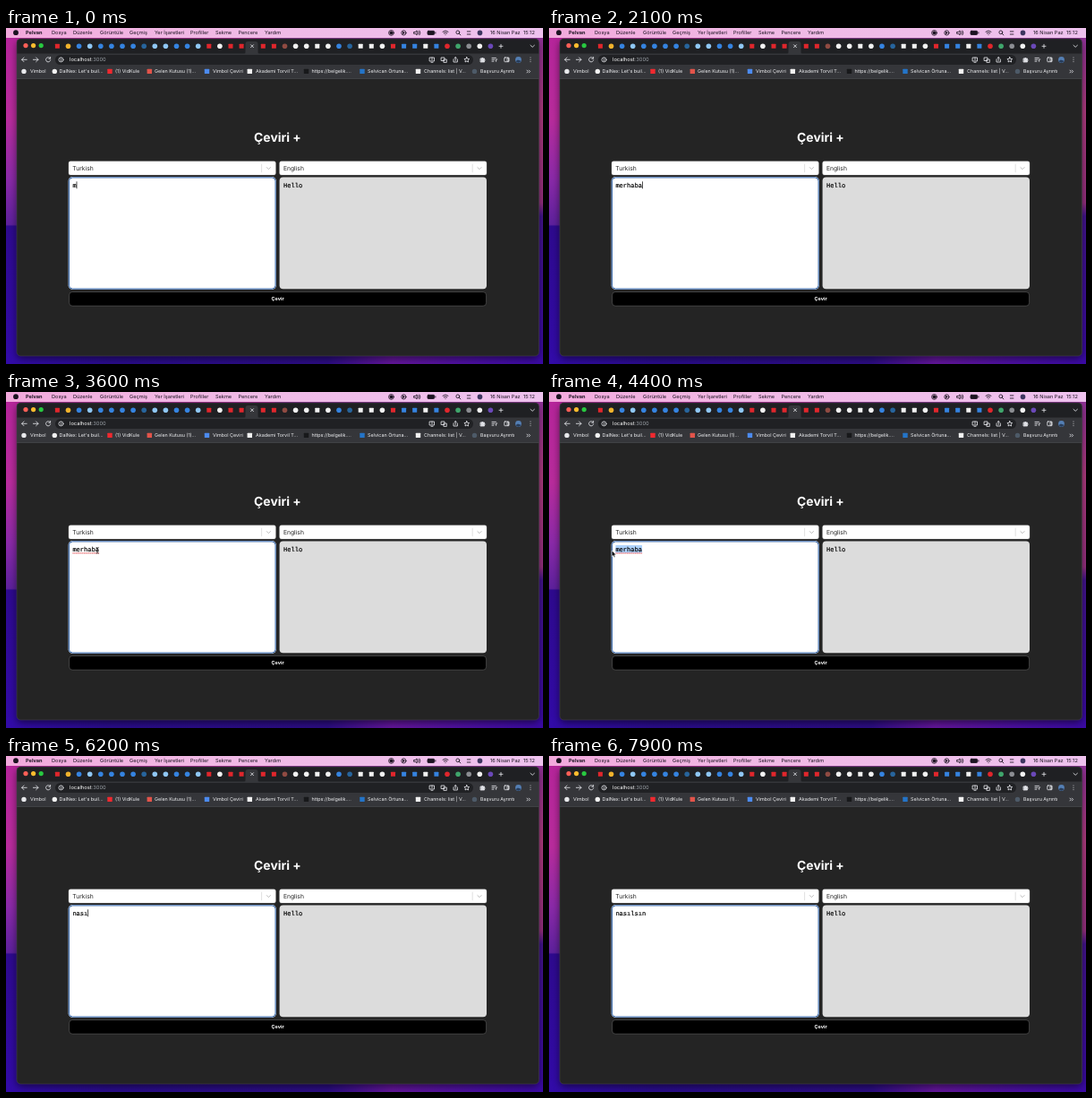
An HTML page for the animation above (8 s loop, 600x375 px).

```html
<!DOCTYPE html>
<html lang="tr">
<head>
<meta charset="utf-8">
<title>Çeviri</title>
<style>
html, body { margin: 0; width: 100%; height: 100%; overflow: hidden; background: #242424; }
svg { display: block; width: 100vw; height: 100vh; font-family: Inter, Roboto, sans-serif; text-rendering: geometricPrecision; }
text { white-space: pre; }
.menu { font-size: 5.6px; fill: #1b1220; }
.marks { font-size: 5.4px; fill: #f2f3f5; }
.pick { font-size: 6.75px; fill: #222; }
.mono { font: 7.06px "Courier New", "Liberation Mono", monospace; fill: #000; stroke: #000; stroke-width: .18; }
.line { fill: none; stroke: #dfe1e5; stroke-width: .85; stroke-linecap: round; stroke-linejoin: round; }
.dark { stroke: #1b1220; }
.bold { font-weight: 700; }
</style>
</head>
<body>
<svg viewBox="0 0 600 375" preserveAspectRatio="none">
  <defs>
    <linearGradient id="left" x1="0" y1="0" x2="0" y2="1">
      <stop offset="0" stop-color="#b5249a"/>
      <stop offset=".27" stop-color="#b82c9c"/>
      <stop offset=".45" stop-color="#8a2aa8"/>
      <stop offset=".585" stop-color="#5e219c"/>
      <stop offset=".59" stop-color="#2e0a8e"/>
      <stop offset="1" stop-color="#320ba8"/>
    </linearGradient>
    <linearGradient id="right" x1="0" y1="0" x2="0" y2="1">
      <stop offset="0" stop-color="#8a3098"/>
      <stop offset=".25" stop-color="#b03c80"/>
      <stop offset=".52" stop-color="#96307f"/>
      <stop offset=".56" stop-color="#43148e"/>
      <stop offset="1" stop-color="#3a0aa4"/>
    </linearGradient>
    <linearGradient id="floor">
      <stop offset="0" stop-color="#320ba8"/>
      <stop offset=".2" stop-color="#2a0c8c"/>
      <stop offset=".6" stop-color="#2c0d84"/>
      <stop offset=".72" stop-color="#64169c"/>
      <stop offset=".88" stop-color="#4a0fa4"/>
      <stop offset="1" stop-color="#3a0aa4"/>
    </linearGradient>
    <linearGradient id="bar">
      <stop offset="0" stop-color="#f2a9dc"/>
      <stop offset=".35" stop-color="#f0b8e4"/>
      <stop offset="1" stop-color="#eec2ee"/>
    </linearGradient>
    <filter id="soft" x="-5%" y="-5%" width="110%" height="110%"><feGaussianBlur stdDeviation="4"/></filter>
    <clipPath id="window"><rect x="12" y="12" width="583.5" height="354" rx="4.5"/></clipPath>
  </defs>

  <rect width="300" height="375" fill="url(#left)"/>
  <rect x="300" width="300" height="375" fill="url(#right)"/>
  <rect y="364" width="600" height="11" fill="url(#floor)"/>
  <rect x="12" y="15" width="583.5" height="354" rx="5" opacity=".55" filter="url(#soft)"/>
  <rect width="600" height="11" fill="url(#bar)"/>

  <!-- menu bar -->
  <circle cx="11" cy="5.2" r="2.9" fill="#1b1220"/>
  <g id="menu" class="menu"></g>
  <g class="line dark">
    <circle cx="430.5" cy="5.4" r="2.9"/>
    <circle cx="430.5" cy="5.4" r="1.6" fill="#1b1220"/>
    <circle cx="444.4" cy="5.4" r="2.6"/>
    <path d="M443.8 4.4l1.6 1-1.6 1z" fill="#1b1220"/>
    <path d="M456 4.5h1.3l1.8-1.6v5l-1.8-1.6H456zM460.7 4q1.1 1.4 0 2.8M462 3q1.8 2.4 0 4.8"/>
    <rect x="471" y="3.3" width="7.6" height="4.2" rx="1" fill="#1b1220"/>
    <path d="M479.9 4.8v1.2M488 4.2q3-2.5 6 0M489.2 5.8q1.8-1.5 3.6 0M491 7.4v.1"/>
    <circle cx="504.8" cy="4.8" r="1.9"/>
    <path d="M506.2 6.2l1.7 1.7M515.3 3.9h3.6M515.3 7h3.6"/>
  </g>
  <circle cx="529.5" cy="5.4" r="2.8" fill="#3d3560"/>

  <!-- browser -->
  <g clip-path="url(#window)">
    <rect x="12" y="12" width="584" height="355" fill="#242424"/>
    <rect x="12" y="12" width="584" height="17" fill="#1f2023"/>
    <path d="M266 29q1.5 0 1.5-2v-9q0-3 3-3h8q3 0 3 3v9q0 2 1.5 2z" fill="#35363a"/>
    <rect x="12" y="28.5" width="584" height="28" fill="#35363a"/>
    <rect x="12" y="56" width="584" height=".7" fill="#4a4b4f"/>
    <rect x="55" y="30" width="467" height="11" rx="5.5" fill="#202124"/>
    <circle cx="22" cy="19.6" r="2.6" fill="#fe5f57"/>
    <circle cx="30.6" cy="19.6" r="2.6" fill="#febc2e"/>
    <circle cx="39.2" cy="19.6" r="2.6" fill="#28c840"/>
    <g id="tabs"></g>
    <g class="line">
      <path d="M273.5 18.7l3 3m0-3l-3 3M551 20.3h4m-2-2v4M586 19.3l2.2 2 2.2-2"/>
      <path d="M23.2 35.3h-5.6m2.4-2.4l-2.4 2.4 2.4 2.4M30.4 35.3H36m-2.4-2.4l2.4 2.4-2.4 2.4"/>
      <path d="M49.3 33.8a2.6 2.6 0 1 0 .4 2.1M49.6 32.4v1.8h-1.8"/>
      <circle cx="61.5" cy="35.4" r="2.5"/>
      <path d="M61.5 35.3v1.2M61.5 34v.1"/>
      <path d="M473.5 33h5v4h-5zM476 33v2.7M475 38.3h2"/>
      <path d="M486.5 33h3.5v3.5h-3.5zM489.3 35h3v3.4h-3z"/>
      <path d="M500 35v3h4.4v-3M502.2 36.4v-3.8m-1.2 1.1l1.2-1.1 1.2 1.1"/>
      <path d="M514.8 32.5l.9 1.9 2 .2-1.5 1.4.4 2-1.8-1-1.8 1 .4-2-1.5-1.4 2-.2z"/>
      <path d="M530.4 34h1.3q.6-2 1.2 0h1.6v1.4q1.8.6 0 1.2v1.4h-4.1z" fill="#dfe1e5"/>
      <path d="M543 33.4h4.4M543 35.3h3M543 37.2h2M547.6 37.4v-2.4h1.2"/>
      <rect x="556.8" y="33" width="5.2" height="4.7" rx=".6"/>
      <path d="M560.4 33.5h1.2v3.8h-1.2zM586 33v.1M586 35.3v.1M586 37.6v.1"/>
    </g>
    <circle cx="572.5" cy="35.4" r="3.4" fill="#547fb4"/>
    <path d="M569.5 37l2.4-1.6 3.6 1.4q-1.2 2-3 2t-3-1.8z" fill="#263c5a"/>
    <text x="71" y="37.4" font-size="5.75" fill="#fff">localhost<tspan fill="#9aa0a6">:3000</tspan></text>
    <g id="marks" class="marks"></g>
    <path class="line" d="M572 47.1l1.3 1.4-1.3 1.4M574.3 47.1l1.3 1.4-1.3 1.4" transform="translate(10)"/>
  </g>
  <rect x="12" y="12" width="583.5" height="354" rx="4.5" fill="none" stroke="#4a4650" stroke-width=".5"/>

  <!-- page -->
  <text class="bold" x="303.4" y="126.7" font-size="13.9" fill="#fff" text-anchor="middle">Çeviri +</text>
  <g id="picks"></g>
  <rect x="69.6" y="166.1" width="232.3" height="125.8" rx="4.6" fill="#dbe8fb"/>
  <rect x="70.4" y="166.9" width="230.7" height="124.2" rx="3.9" fill="#fff" stroke="#285a9f" stroke-width="1"/>
  <rect x="305.6" y="166.6" width="231.4" height="124.6" rx="4" fill="#dcdcdc"/>
  <text class="mono" x="310" y="177.7">Hello</text>
  <rect x="70.6" y="294.6" width="466" height="15.6" rx="3.5" fill="#000" stroke="#666" stroke-width=".6"/>
  <text class="bold" x="303.6" y="304.2" font-size="5.5" fill="#fff" text-anchor="middle">Çevir</text>

  <!-- moving parts -->
  <rect id="mark" y="171" height="8.6" fill="#aed2fb"/>
  <text id="word" class="mono" x="74.4" y="177.7"></text>
  <path id="wavy" d="M74.4 179.9h29.7" stroke="#e5484d" stroke-width="1" stroke-dasharray="1.3 .5"/>
  <rect id="caret" y="171.3" width=".7" height="8" fill="#000"/>
  <path id="beam" d="M-1.5-3.3q1.2 0 1.5.7q.3-.7 1.5-.7M0-2.6V2.6M-1.5 3.3q1.2 0 1.5-.7q.3.7 1.5.7" fill="none" stroke="#222" stroke-width=".8"/>
  <path id="arrow" d="M0-4v6.6l1.5-1.4 1 2.3 1.1-.5-1-2.2h2z" fill="#000" stroke="#fff" stroke-width=".45"/>
</svg>

<script>
const $ = id => document.getElementById(id);
const LOOP = 8000, LEFT = 74.4, CHAR = 4.236, END = LEFT + 7 * CHAR;

const dot = (x, y, r, fill) => `<circle cx="${x}" cy="${y}" r="${r}" fill="${fill}"/>`;
const box = (x, y, r, fill) =>
  `<rect x="${x - r}" y="${y - r}" width="${2 * r}" height="${2 * r}" rx=".5" fill="${fill}"/>`;
const label = (x, y, s, cls = "") => `<text class="${cls}" x="${x}" y="${y}">${s}</text>`;

$("menu").innerHTML = [
  [22, "Pelvan", "bold"], [51, "Dosya"], [75, "Düzenle"], [105, "Görüntüle"], [138, "Geçmiş"],
  [166, "Yer İşaretleri"], [206, "Profiller"], [234, "Sekme"], [259.5, "Pencere"], [289, "Yardım"],
  [541, "16 Nisan Paz"], [578, "15:12"]
].map(([x, s, cls]) => label(x, 7.4, s, cls)).join("");

// one letter per tab; capitals are square icons
const tint = { r: "#e0262c", y: "#f0b22c", b: "#3583e0", n: "#27649c", w: "#f2f2f2", a: "#8fc7f5", g: "#3fa56b", k: "#8b8d92", p: "#6a48b8", o: "#8f4a42" };
$("tabs").innerHTML = [..."Rybabbbbnaabba" + "RwRR-RRowwWwbnWWwRBBWBrgkwp"].map((c, i) => {
  const key = c.toLowerCase();
  return key in tint ? (c === key ? dot : box)(57.4 + 12.1 * i, 20.2, c === key ? 2.8 : 2.5, tint[key]) : "";
}).join("");

$("marks").innerHTML = [
  [20, dot, "#e8e9ec", 27, "Vimbol"],
  [54.3, dot, "#f2f2f2", 59.5, "DalNex: Let's buil..."],
  [116, box, "#f0292f", 122, "(1) VidKule"],
  [160.3, box, "#e2544a", 166, "Gelen Kutusu (1)..."],
  [224.5, box, "#4c8bf0", 231, "Vimbol Çeviri"],
  [272.3, box, "#f2f2f2", 279, "Akademi Torvil T..."],
  [335.5, box, "#17181a", 341.5, "https://belgelik...."],
  [398, box, "#2474c8", 404, "Selvican Örtuna..."],
  [460.5, box, "#f2f2f2", 467, "Channels: list | V..."],
  [523.5, dot, "#4d5a68", 530, "Başvuru Ayrıntı"]
].map(([x, icon, fill, tx, s]) => icon(x, 48.4, 2.7, fill) + label(tx, 50.4, s)).join("");

$("picks").innerHTML = [[70, "Turkish"], [305.6, "English"]].map(([x, s]) =>
  `<rect x="${x}" y="148.7" width="231.4" height="15.4" rx="2" fill="#fff" stroke="#ccc" stroke-width=".3"/>
   <path d="M${x + 215.6} 151.8v9.4" stroke="#ccc" stroke-width=".6"/>
   <path d="M${x + 221} 155.3l2.4 2.4 2.4-2.4" fill="none" stroke="#bbb" stroke-width="1"/>` +
  label(x + 4.3, 158.9, s, "pick")).join("");

// [time, content] of each keystroke
const typeOut = (word, from, to) =>
  [...word].map((_, i, all) => [from + (to - from) * i / (all.length - 1), word.slice(0, i + 1)]);
const keys = [...typeOut("merhaba", 0, 1100), [4800, ""], ...typeOut("nasılsın", 5500, 7000)];

// pointer stops: time, x, y
const stops = [[2400, 133, 196], [2750, 120, 186], [2900, 120, 186], [3300, 104, 176.5], [3500, 104, 176.5], [4200, 70.3, 181]];

function pointerAt(t) {
  let i = 0;
  while (i < stops.length - 2 && t >= stops[i + 1][0]) i++;
  const [a, b] = [stops[i], stops[i + 1]];
  const p = Math.min(1, Math.max(0, (t - a[0]) / (b[0] - a[0])));
  const e = p * p * (3 - 2 * p);
  return [a[1] + (b[1] - a[1]) * e, a[2] + (b[2] - a[2]) * e];
}

const show = (id, on) => $(id).setAttribute("visibility", on ? "visible" : "hidden");

function draw(now) {
  const t = Math.floor(now % LOOP / 100) * 100;
  const [since, word] = keys.filter(k => k[0] <= t).pop();
  const [x, y] = pointerAt(t);
  const pointing = t >= 2400 && t < 4800;
  const picked = t >= 3500 && t < 4800 ? Math.round((END - Math.max(LEFT, x)) / CHAR) : 0;
  const onText = x > 73;

  if ($("word").textContent !== word) $("word").textContent = word;
  $("caret").setAttribute("x", LEFT + word.length * CHAR);
  show("caret", !picked && (t - since) % 1000 < 500);
  show("wavy", pointing);
  $("mark").setAttribute("x", END - picked * CHAR);
  $("mark").setAttribute("width", picked * CHAR);
  for (const id of ["beam", "arrow"]) $(id).setAttribute("transform", `translate(${x} ${y})`);
  show("beam", pointing && onText);
  show("arrow", pointing && !onText);
}

function tick() {
  draw(performance.now());
  requestAnimationFrame(tick);
}
tick();
</script>
</body>
</html>
```
